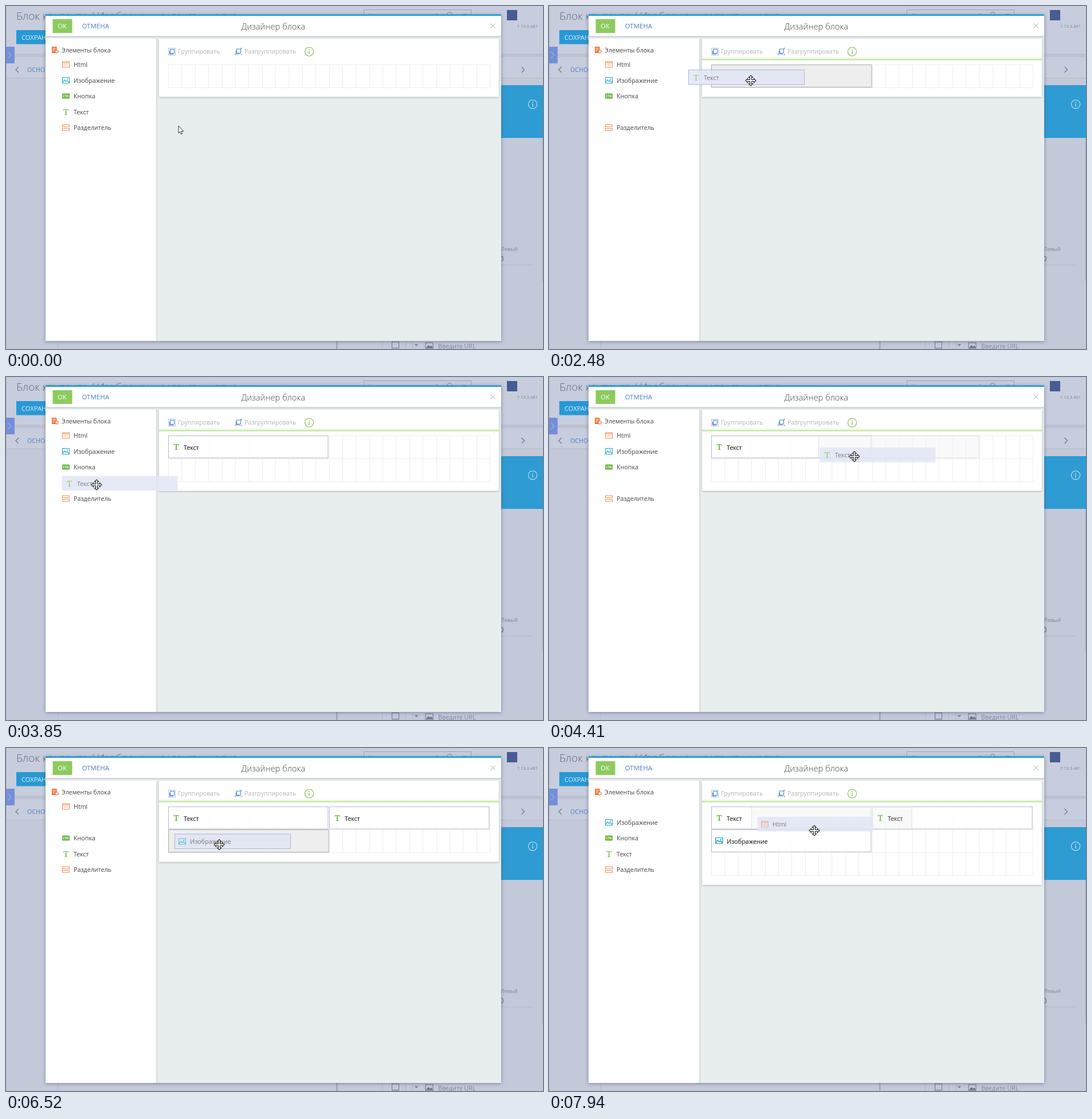
Animation, 937 px wide and 598 px high, one loop 8000 ms. Source, as an HTML page:

```html
<!DOCTYPE html>
<html lang="ru">
<head>
<meta charset="utf-8">
<title>Дизайнер блока</title>
<style>
  html, body { margin: 0; width: 100%; height: 100%; overflow: hidden; background: #c4c9da; }
  svg { display: block; width: 937px; height: 598px; }
  text { font-family: "Open Sans", "Noto Sans", sans-serif; font-size: 10.7px; fill: #444; white-space: pre; }
  .serif { font-family: "Noto Serif", "Liberation Serif", serif; }
</style>
</head>
<body>
<svg id="stage" viewBox="0 0 937 598" xmlns="http://www.w3.org/2000/svg">
  <defs>
    <filter id="dialogShadow" x="-5%" y="-5%" width="110%" height="110%">
      <feDropShadow dx="0" dy="1" stdDeviation="3" flood-color="#3c4560" flood-opacity=".55"/>
    </filter>
    <filter id="panelShadow" x="-5%" y="-10%" width="110%" height="120%">
      <feDropShadow dx="0" dy="1" stdDeviation="1.5" flood-color="#000" flood-opacity=".3"/>
    </filter>
  </defs>
  <g id="page"></g>
  <g id="dialog"></g>
  <g id="live"></g>
</svg>
<script>
const LOOP = 8000;
const GRID = { x: 283, y: 102, cols: 24, col: 23.375, row: 40.2, span: 12 };
const ORANGE = '#ee8a4e', CYAN = '#1fa5c8', GREEN = '#6db745';
const GHOST_WIDTH = 202;

const rect = (x, y, w, h, fill, extra = '') =>
  `<rect x="${x}" y="${y}" width="${w}" height="${h}" fill="${fill}" ${extra}/>`;
const frame = (x, y, w, h, stroke, fill = 'none') =>
  rect(x, y, w, h, fill, `stroke="${stroke}"`);
const line = (d, stroke, width = 1) =>
  `<path d="${d}" fill="none" stroke="${stroke}" stroke-width="${width}"/>`;
const label = (x, y, str, fill = '#444', size = 10.7, extra = '') =>
  `<text x="${x}" y="${y}" style="fill:${fill};font-size:${size}px" ${extra}>${str}</text>`;
const at = (x, y, body) => `<g transform="translate(${x} ${y})">${body}</g>`;
const infoMark = (x, y, color) => at(x, y,
  `<circle r="7.6" fill="none" stroke="${color}" stroke-width="1.1"/>` +
  line('M0 -1.5V4M0 -4.3v1.4', color, 1.3));

// Element icons are centred on their own origin.
const icons = {
  html: frame(-6, -5, 12, 10, ORANGE) + line('M-6 -3H6', ORANGE) +
    line('M-2 -1.2L-4 .8L-2 2.8M2 -1.2L4 .8L2 2.8M.8 -1.5L-.8 3', ORANGE, .8),
  image: frame(-6, -5, 12, 10, CYAN) +
    line('M-5.5 3.5L-2.5 -.5L0 2L2 .5L5.5 3.5', CYAN, 1.2) +
    `<circle cx="2.8" cy="-2" r="1.1" fill="${CYAN}"/>`,
  button: rect(-6.5, -4.5, 13, 9, GREEN, 'rx="1"') +
    label(0, 2.1, 'CTA', '#fff', 5.6, 'text-anchor="middle" font-weight="700"'),
  text: label(0, 5.2, 'T', GREEN, 15, 'text-anchor="middle" class="serif"'),
  divider: frame(-6, -5, 12, 3.6, ORANGE) + frame(-6, 1.4, 12, 3.6, ORANGE)
};

const rows = [
  ['html', 'Html'], ['image', 'Изображение'], ['button', 'Кнопка'],
  ['text', 'Текст'], ['divider', 'Разделитель']
].map(([kind, name], i) => ({ kind, name, x: 91.5, y: 89 + 27.5 * i, w: 169, h: 26 }));

const rowContent = (r, x, y) =>
  at(x + 13, y + 13, icons[r.kind]) + label(x + 26.5, y + 17, r.name);

// Cursor moves: start, end, number of steps, destination.
const moves = [
  [80, 80, 1, 297, 205], [160, 160, 1, 299, 206],
  [470, 470, 1, 298, 205], [550, 550, 1, 297, 204],
  [1310, 1720, 6, 200, 190],
  [2050, 2480, 7, 352, 130], [2550, 2840, 5, 372, 131],
  [3070, 3620, 8, 152, 187],
  [3850, 3850, 1, 158, 188], [3930, 4640, 10, 636, 125],
  [4960, 5340, 6, 252, 138], [5420, 5570, 3, 169, 135],
  [5840, 6520, 10, 372, 168.5],
  [6980, 7460, 7, 191, 113],
  [7710, 7940, 4, 463, 144]
];

const drags = [
  { from: 2050, to: 2840, row: 3, grab: [200, 190], col: 0, line: 0 },
  { from: 3850, to: 4960, row: 3, grab: [152, 187], col: 12, line: 0 },
  { from: 5840, to: 6980, row: 1, grab: [169, 135], col: 0, line: 1 },
  { from: 7710, to: 9000, row: 0, grab: [191, 113] }
];

const ease = p => p * p * (3 - 2 * p);

function cursorAt(t) {
  let x = 301, y = 209;
  for (const [start, end, steps, toX, toY] of moves) {
    if (t < start) break;
    const k = t >= end ? steps : 1 + Math.floor((t - start) / (end - start) * (steps - 1) + 1e-6);
    const p = ease(k / steps);
    x += (toX - x) * p;
    y += (toY - y) * p;
  }
  return { x, y };
}

const inside = (p, b) => p.x >= b.x && p.x <= b.x + b.w && p.y >= b.y && p.y <= b.y + b.h;
const slot = (col, row) => ({
  x: GRID.x + col * GRID.col, y: GRID.y + row * GRID.row,
  w: GRID.span * GRID.col, h: GRID.row - .5
});

function gridLines(count) {
  const right = GRID.x + 561, bottom = GRID.y + GRID.row * count;
  let d = '';
  for (let c = 0; c <= GRID.cols; c++) d += `M${Math.round(GRID.x + c * GRID.col) + .5} ${GRID.y}V${bottom}`;
  for (let r = 0; r <= count; r++) d += `M${GRID.x} ${Math.floor(GRID.y + r * GRID.row) + .5}H${right}`;
  return line(d, '#ededed');
}

function placedItem(drag) {
  const b = slot(drag.col, drag.line), r = rows[drag.row];
  const x = Math.round(b.x) + .5, y = Math.floor(b.y) + .5;
  return frame(x, y, b.w - 2, b.h - 1.2, '#b3b8cb', 'rgba(255,255,255,.82)') +
    at(x + 13.5, y + 19, icons[r.kind]) + label(x + 26.5, y + 24.5, r.name);
}

const arrow = `<path d="M0 0V12.6L2.8 10L4.8 14.6L6.8 13.7L4.8 9.3H8.8Z" fill="#fff" stroke="#333"/>`;
const mover = `<path d="M0-9l3.5 3.5h-2v4h4v-2l3.5 3.5-3.5 3.5v-2h-4v4h2l-3.5 3.5-3.5-3.5h2v-4h-4v2l-3.5-3.5 3.5-3.5v2h4v-4h-2z" fill="#fff" stroke="#222" stroke-width="1.1"/>`;

function ghostAndSlot(drag, cur, items, count) {
  const r = rows[drag.row];
  const gx = r.x + cur.x - drag.grab[0], gy = r.y + cur.y - drag.grab[1];
  let placeholder = '', free = false;
  if (cur.x > 267 && cur.y > 94) {
    const clamp = (v, max) => Math.max(0, Math.min(max, Math.floor(v)));
    const col = clamp((gx - GRID.x) / GRID.col, GRID.cols - GRID.span);
    const row = clamp((gy - GRID.y) / GRID.row, count - 1);
    free = !items.some(i => i.line === row && Math.abs(i.col - col) < GRID.span);
    const b = slot(col, row), x = Math.round(b.x) + .5, y = Math.floor(b.y) + .5;
    placeholder = free
      ? frame(x, y, b.w - 1, b.h - .7, '#adadad', 'rgba(238,238,238,.95)')
      : frame(x, y, b.w - 1, b.h - 1, 'rgba(150,150,150,.25)', 'rgba(246,246,246,.6)');
  }
  const ghost = `<g opacity=".86">` +
    rect(gx, gy, GHOST_WIDTH, 25.5, '#e2e7f6', free ? 'stroke="#9fadda"' : '') +
    `<g opacity=".8">${rowContent(r, gx, gy)}</g></g>`;
  return { placeholder, ghost };
}

function scene(t) {
  const cur = cursorAt(t);
  const drag = drags.find(d => t >= d.from && t < d.to);
  const items = drags.filter(d => t >= d.to);
  const count = 1 + Math.max(0, ...items.map(i => i.line + 1));
  const hover = drag ? null : rows.find(r => inside(cur, r));
  const overItem = items.some(i => inside(cur, slot(i.col, i.line)));

  let out = rect(267, 57, 593, 61 + GRID.row * count, '#fff', 'filter="url(#panelShadow)"');
  out += toolbar + gridLines(count);
  if (drag) out += rect(267, 90, 593, 5, '#a5dc74', 'opacity=".18"') + rect(267, 92.5, 593, 2, '#bfe89d');
  for (const r of rows) {
    if (r === hover) out += frame(r.x, r.y - .5, r.w, r.h, '#8d9fd3');
    if (!drag || rows[drag.row] !== r) out += rowContent(r, r.x, r.y);
  }
  const carried = drag ? ghostAndSlot(drag, cur, items, count) : { placeholder: '', ghost: '' };
  out += items.map(placedItem).join('') + carried.placeholder;
  // Captions stay readable over an occupied slot.
  if (drag) out += items.map(i => {
    const b = slot(i.col, i.line), r = rows[i.row];
    const x = Math.round(b.x) + .5, y = Math.floor(b.y) + .5;
    return at(x + 13.5, y + 19, icons[r.kind]) + label(x + 26.5, y + 24.5, r.name);
  }).join('');
  out += carried.ghost;
  return out + at(cur.x, cur.y, drag || hover || overItem ? mover : arrow);
}

const copyIcon = frame(.5, .5, 12, 12, '#a9c4ea') + frame(3.5, 2.5, 7, 7, '#4a83cf') +
  line('M2.5 5V11H9', '#4a83cf');
const splitIcon = frame(3.5, 2.5, 7, 7, '#4a83cf') + line('M2.5 5V11H9', '#4a83cf') +
  line('M10 1.5h3M11.5 0v3M.5 10v2.5h2M10 12.5h2.5v-2', '#7fa6de');
const toolbar = at(283, 73, copyIcon) + label(300, 83.3, 'Группировать', '#b4b4b4') +
  at(399, 72.5, splitIcon) + label(416, 83.3, 'Разгруппировать', '#b4b4b4') +
  infoMark(529, 79.6, '#7dbd4f');

document.getElementById('page').innerHTML =
  rect(0, 0, 937, 598, '#c4c9da') +
  rect(0, 0, 937, 83, '#c8cddd') + rect(0, 83, 937, 6, '#bcc2d3') +
  rect(0, 89, 937, 36, '#c8cddd') + line('M0 125.5H937', '#b2b9cd') +
  line('M.5 0V598', '#b4bbcf') + line('M90.5 560V598', '#b4bbcf') +
  label(18, 24, 'Блок контента / Изображение+текст+кнопка', '#626a84', 18.7, 'font-weight="300"') +
  frame(624.5, 6.5, 187, 19, '#98a1b9') +
  label(633, 20, 'Что я могу для вас сделать?', '#8990a8', 9) +
  line('M770 14.5a4 4 0 0 1 8 0M797 14.5h7', '#7882a0') +
  rect(874, 7, 18, 18, '#465c92') +
  label(928, 37.5, '7.13.3.481', '#7f879f', 7.6, 'text-anchor="end"') +
  rect(18, 42, 90, 24.5, '#2799d5') + label(27, 59, 'СОХРАНИТЬ', '#e4edf8', 11.2) +
  rect(0, 71, 15, 29, '#738fd7') + line('M3.5 80L9 85.5L3.5 91', '#b9c8ec') +
  line('M22 106L17 111L22 116M899.5 106L904.5 111L899.5 116', '#6d7690', 1.2) +
  label(37, 115, 'ОСНОВНЫЕ', '#4b7fc7', 10.7) +
  rect(800, 138, 137, 92, '#2f9bd3') + infoMark(919, 171.3, '#cfe2f2') +
  label(893, 427, 'Левый', '#7e869d', 9.1, 'text-anchor="end"') +
  label(861.5, 445, '0', '#525a73', 12) + line('M800 451.5H919', '#b1b8cb') +
  rect(935.5, 230, 1.5, 250, '#b0b7cb') +
  rect(576, 570, 2.5, 28, '#9ea6bd') + line('M656.5 580V598M697.5 580V598M709.5 580V598', '#b1b8cb') +
  frame(673.5, 585.5, 12, 11, '#6c748b') +
  `<path d="M712.5 589.5h7l-3.5 3.8z" fill="#7a829a"/>` +
  frame(732, 587, 13, 10, '#69718a') + `<path d="M733 596l4-5 3 3 2-2 3 4z" fill="#69718a"/>` +
  label(754, 596.5, 'Введите URL', '#7f879f', 10.7);

document.getElementById('dialog').innerHTML =
  rect(69, 15, 795, 569, '#e8edee', 'filter="url(#dialogShadow)"') +
  rect(69, 17, 795, 35, '#fff') + rect(69, 52, 795, 3, '#d5d9db') +
  rect(69, 14.5, 795, 2.7, '#1c9ed8') +
  rect(69, 57, 193.5, 527, '#fff') + rect(262.5, 57, 1.5, 527, '#d0d4d6') +
  rect(81.5, 23, 34, 24, '#8ccb5e') + label(90, 39.3, 'ОК', '#fff', 11.5) +
  label(132.5, 39.3, 'ОТМЕНА', '#4a7fcb', 11.5) +
  label(466.3, 40.5, 'Дизайнер блока', '#444', 14.8, 'text-anchor="middle" font-weight="300"') +
  line('M845.5 30.5l8 8m0 -8l-8 8', '#a5a5a5') +
  at(80, 71, rect(0, 0, 8.5, 11, '#ea7439') + line('M1.5 2.5h5M1.5 5h5M1.5 7.5h3', '#fff', .9) +
    `<circle cx="8.6" cy="8.3" r="2.6" fill="#fff" stroke="#ea7439" stroke-width="1.6" stroke-dasharray="1.5 .6"/>`) +
  label(97, 80.8, 'Элементы блока');

const live = document.getElementById('live');
const began = performance.now();
let shown = '';

function draw() {
  const next = scene((performance.now() - began) % LOOP);
  if (next !== shown) live.innerHTML = shown = next;
  requestAnimationFrame(draw);
}
draw();
</script>
</body>
</html>
```
